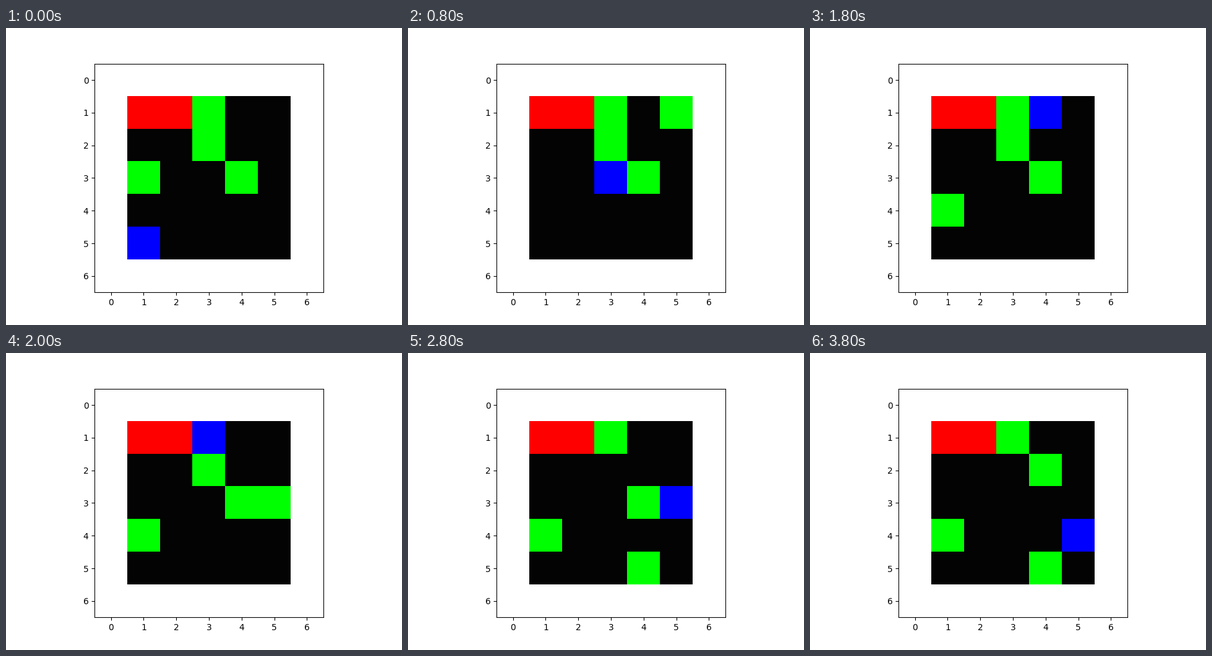
Animation, 640 px wide and 480 px high, one loop 4000 ms. Source, as a matplotlib script:

```python
import numpy as np
import matplotlib.pyplot as plt
from matplotlib.animation import FuncAnimation

SIZE, STEPS = 7, 20
WHITE, DARK = (255, 255, 255), (3, 3, 3)
RED, GREEN, BLUE = (255, 0, 0), (0, 255, 0), (0, 0, 255)

START = (5, 1)
ON_BOARD = 4
RIGHT_BIAS = 0.75
# Food in order of appearance (row, column): the first few lie on the board,
# every piece eaten brings in the next one.
FOOD = [(1, 3), (2, 3), (3, 1), (3, 4), (1, 5), (4, 1), (3, 4),
        (3, 5), (2, 5), (1, 3), (5, 4), (4, 4), (2, 4)]


def choose(agent, food):
    """Nearest piece of food, with a leaning to the right."""
    def cost(cell):
        distance = abs(cell[0] - agent[0]) + abs(cell[1] - agent[1])
        return distance - RIGHT_BIAS * cell[1]
    return min(food, key=cost)


def step_towards(agent, goal):
    """One cell closer to the goal, rows before columns."""
    row, col = agent
    if row != goal[0]:
        return row + (1 if goal[0] > row else -1), col
    return row, col + (1 if goal[1] > col else -1)


def simulate():
    """Yield the agent cell and the food cells for each step."""
    agent, food = START, FOOD[:ON_BOARD]
    queue = FOOD[ON_BOARD:]
    side = 1
    for _ in range(STEPS):
        yield agent, list(food)
        if queue:
            agent = step_towards(agent, choose(agent, food))
        else:  # nothing new to come: pace right and left
            agent = (agent[0], agent[1] + side)
            side = -side
        if agent in food:
            food.remove(agent)
            food.append(queue.pop(0))


def render(agent, food):
    grid = np.full((SIZE, SIZE, 3), WHITE, dtype=np.uint8)
    grid[1:-1, 1:-1] = DARK
    grid[1, 1:3] = RED
    for cell in food:
        grid[cell] = GREEN
    grid[agent] = BLUE
    return grid


boards = [render(agent, food) for agent, food in simulate()]

fig, ax = plt.subplots(figsize=(6.4, 4.8), dpi=100)
image = ax.imshow(boards[0], interpolation="nearest")
ax.set_xticks(range(SIZE))
ax.set_yticks(range(SIZE))


def update(step):
    image.set_data(boards[step])
    return [image]


anim = FuncAnimation(fig, update, frames=STEPS, interval=200,
                     repeat=True, repeat_delay=0)
plt.show()
```
